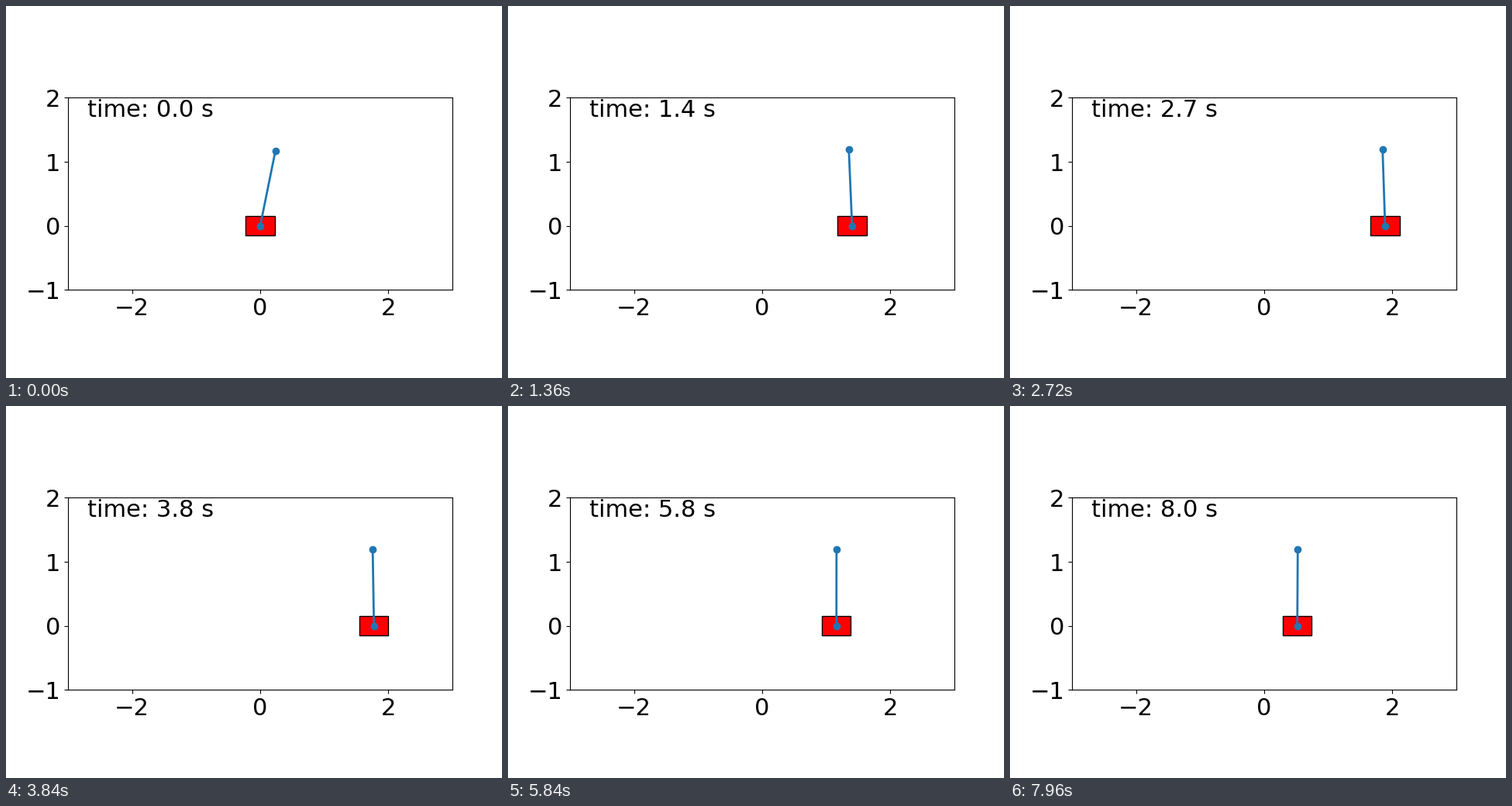
Write a matplotlib script that moves like this. It is 640 px wide and 480 px high and loops after 8000 ms.

```python
import numpy as np
import matplotlib.pyplot as plt
from matplotlib.animation import FuncAnimation
from matplotlib.patches import Rectangle

FRAMES, STEP = 200, 40           # frame count, ms per frame
CART_W, CART_H, POLE = 0.45, 0.3, 1.2
GRAVITY = 9.8
THETA0 = 0.2                     # initial lean, rad

# Closed-loop modes: a slow damped swing and a fast critically damped part
AMP, DAMP, FREQ, SHIFT = 6.119, 0.292, 0.277, 0.14
FAST = 3.1


def slow(t):
    """Position, velocity, acceleration and jerk of the slow mode."""
    tau = t - SHIFT
    env = AMP * np.exp(-DAMP * tau)
    x = env * np.sin(FREQ * tau)
    v = env * FREQ * np.cos(FREQ * tau) - DAMP * x
    k = DAMP**2 + FREQ**2
    a = -2 * DAMP * v - k * x
    j = -2 * DAMP * a - k * v
    return x, v, a, j


def fast(t, value, rate):
    """Critically damped decay from a given value and rate."""
    return (value + (rate + FAST * value) * t) * np.exp(-FAST * t)


X0, V0, A0, J0 = slow(0.0)


def state(t):
    """Cart position and pole angle at time t, released from rest."""
    x, _, a, _ = slow(t)
    pos = x + fast(t, -X0, -V0)
    theta = a / GRAVITY + fast(t, THETA0 - A0 / GRAVITY, -J0 / GRAVITY)
    return pos, theta


plt.rcParams.update({"font.family": "DejaVu Sans", "font.size": 22})
fig = plt.figure(figsize=(6.4, 4.8), dpi=100)
ax = fig.add_subplot(111)
ax.set_xlim(-3, 3)
ax.set_ylim(-1, 2)
ax.set_aspect("equal")
ax.set_xticks([-2, 0, 2])
ax.set_yticks([-1, 0, 1, 2])

cart = ax.add_patch(Rectangle((-CART_W / 2, -CART_H / 2), CART_W, CART_H,
                              facecolor="red", edgecolor="black", linewidth=1))
pole, = ax.plot([], [], "o-", color="tab:blue", lw=2, markersize=6)
clock = ax.text(0.05, 0.9, "", transform=ax.transAxes)


def draw(i):
    t = i * STEP / 1000
    x, theta = state(t)
    cart.set_x(x - CART_W / 2)
    pole.set_data([x, x + POLE * np.sin(theta)], [0, POLE * np.cos(theta)])
    clock.set_text(f"time: {t:.1f} s")
    return cart, pole, clock


anim = FuncAnimation(fig, draw, frames=FRAMES, interval=STEP,
                     init_func=lambda: draw(0), repeat=True, repeat_delay=0)
plt.show()
```
